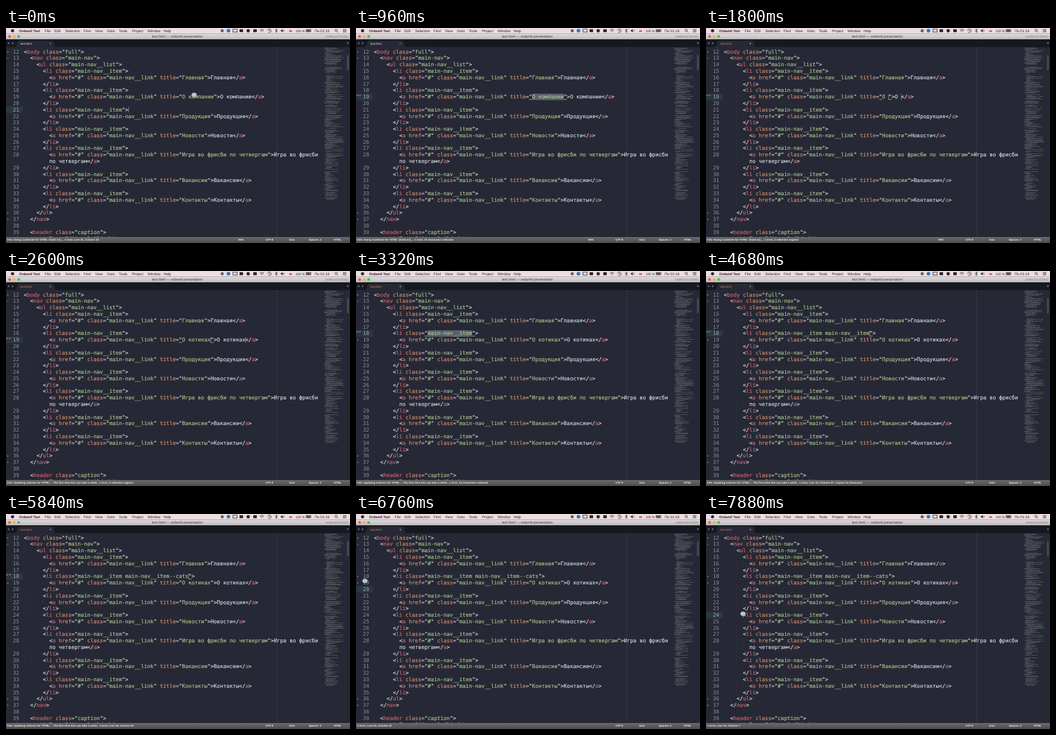
Recreate the animation shown at these times as an HTML page. Size 576 by 360 pixels, loop 8 s.

```html
<!DOCTYPE html>
<html lang="ru">
<head>
<meta charset="utf-8">
<title>Editor</title>
<style>
html, body { margin: 0; width: 100%; height: 100%; overflow: hidden; background: #262935; }
svg { display: block; width: 100vw; height: 100vh; }
text { white-space: pre; text-rendering: geometricPrecision; font-family: "Liberation Sans", Arial, sans-serif; }
.code text { font: 8.8px "DejaVu Sans Mono", monospace; stroke-width: .16px; }
.menu { font-size: 6.05px; fill: #2a2023; }
.status { font-size: 4.52px; font-weight: bold; fill: #eeeeef; }
</style>
</head>
<body>
<svg viewBox="0 0 576 360">
  <defs>
    <linearGradient id="title" x2="0" y2="1"><stop stop-color="#dedbde"/><stop offset="1" stop-color="#bfbcc0"/></linearGradient>
    <linearGradient id="bar" x2="0" y2="1"><stop stop-color="#6a6a6c"/><stop offset="1" stop-color="#4c4c4e"/></linearGradient>
  </defs>
  <g id="back"></g>
  <g id="editor" class="code"></g>
  <g id="chrome"></g>
  <g id="live"></g>
  <ellipse id="pointer" rx="4.2" ry="3.6" fill="#c3c5cc" stroke="#8f929c" stroke-width=".6"/>
</svg>
<script>
const LOOP = 8000, CHAR = 5.298, LEFT = 30, ROW = 10.79, FIRST = 12;
const COLOR = { bg: '#262935', text: '#d6d9df', tag: '#d4626e', attr: '#da9070', string: '#b0c68e' };
const $ = id => document.getElementById(id);
const esc = s => s.replace(/&/g, '&amp;').replace(/</g, '&lt;');
const rect = (x, y, w, h, fill, extra = '') =>
  `<rect x="${x}" y="${y}" width="${w}" height="${h}" fill="${fill}" ${extra}/>`;
const circle = (x, y, r, fill) => `<circle cx="${x}" cy="${y}" r="${r}" fill="${fill}"/>`;
const path = (d, stroke, width = .8, extra = '') =>
  `<path d="${d}" fill="none" stroke="${stroke}" stroke-width="${width}" ${extra}/>`;
const label = (x, y, s, extra = '') => `<text x="${x}" y="${y}" ${extra}>${esc(s)}</text>`;
const span = (s, color) => `<tspan fill="${color}" stroke="${color}">${esc(s)}</tspan>`;
const colX = col => LEFT + col * CHAR;
const rowY = line => 34.4 + (line - FIRST + (line > 28)) * ROW;

// ---- timeline of editor states ----
const INTEL = "Info: Doing CodeIntel for 'HTML' (hold on)..., ";
const INDEX = "Info: Updating indexes for 'HTML'... The first time this can take a while., ";
const TITLE_COL = 50, CLASS_COL = 17, ITEM = 'main-nav__item', MARKED = [12, 13, 36, 37];
const steps = [];
let state = {
  info: INTEL, pct: '95%', status: 'Line 21, Column 34', line: 21, carets: [33],
  sel: [], quotes: null, title: 'О компании', cls: ITEM, dirty: false, edited: []
};
function at(time, change) {
  state = { ...state, ...change, time };
  steps.push(state);
}
const titleEnds = n => [TITLE_COL + n, TITLE_COL + 2 * n + 2];
function setTitle(time, title) {
  const n = title.length;
  at(time, { title, carets: titleEnds(n), sel: [], quotes: [TITLE_COL - 1, TITLE_COL + n],
    pct: '80%', dirty: true, edited: [19] });
}
function setClass(time, cls, note = '') {
  const end = CLASS_COL + cls.length;
  at(time, { cls, carets: [end], sel: [], quotes: [CLASS_COL - 1, end], edited: cls === ITEM ? [19] : [18, 19],
    status: `Line 18, Column ${end + 1}${note}` });
}
at(0, {});
at(440, { line: 19, carets: [54], status: 'Line 19, Column 55', quotes: [49, 60] });
at(860, { carets: [], sel: [[50, 10]], status: '10 characters selected' });
at(1200, { sel: [[50, 10], [62, 10]], status: '2 selection regions' });
setTitle(1480, 'О');
setTitle(1640, 'О ');
[...'котиках'].forEach((c, i) => setTitle(1880 + i * 100, state.title + c));
at(2600, { info: INDEX, pct: '' });
at(2760, { carets: [59], status: 'Line 19, Column 60', quotes: [49, 59] });
at(2960, { line: 18, carets: [31], status: 'Line 18, Column 32', quotes: [16, 31] });
at(3160, { carets: [], sel: [[17, 14]], status: '14 characters selected' });
const copied = '; Copied 14 characters';
setClass(3640, ITEM, copied);
setClass(3960, ITEM + ' ', copied);
setClass(4320, ITEM + ' ' + ITEM, copied);
[...'--cats'].forEach((c, i) => setClass(5000 + i * 140, state.cls + c));
at(6200, { info: '', line: 20, carets: [11], quotes: null, status: 'Line 20, Column 12' });
at(7600, { line: 24, carets: [6], status: 'Line 24, Column 7' });

// ---- code ----
function paint(code) {
  return code.split(/(<\/?\w+|"[^"]*"|\b(?:class|href|title)(?==))/).map(part => {
    if (/^<\/?\w/.test(part)) {
      const [, open, tag] = part.match(/^(<\/?)(\w+)/);
      return span(open, COLOR.text) + span(tag, COLOR.tag);
    }
    if (part[0] === '"') return span('"', COLOR.text) + span(part.slice(1, -1), COLOR.string) + span('"', COLOR.text);
    return span(part, /^(class|href|title)$/.test(part) ? COLOR.attr : COLOR.text);
  }).join('');
}
function codeLines(s) {
  const lines = [[0, '<body class="full">'], [2, '<nav class="main-nav">'], [4, '<ul class="main-nav__list">']];
  const items = ['Главная', s.title, 'Продукция', 'Новости', 'Игра во фрисби по четвергам', 'Вакансии', 'Контакты'];
  items.forEach((name, i) => lines.push(
    [6, `<li class="${i === 1 ? s.cls : ITEM}">`],
    [8, `<a href="#" class="main-nav__link" title="${name}">${name}</a>`],
    [6, '</li>']));
  lines.push([4, '</ul>'], [2, '</nav>'], [0, ''], [2, '<header class="caption">'],
    [4, '<h1>Text Editor Build</h1>']);
  return lines;
}
function drawRow(indent, y, code) {
  let guides = '';
  for (let c = 0; c < indent; c += 2)
    guides += path(`M${colX(c) + .5} ${y}v${ROW}`, '#353945', .6, 'stroke-dasharray="1 1.2"');
  return guides + `<text x="${colX(indent)}" y="${y + 8.2}">${paint(code)}</text>`;
}
function drawEditor(s) {
  const y = rowY(s.line);
  let out = rect(0, y, 28, ROW, '#2b3841');
  for (const [col, n] of s.sel) out += rect(colX(col), y, n * CHAR, ROW, '#596170', 'rx="1"');
  codeLines(s).forEach(([indent, code], i) => {
    const line = FIRST + i, top = rowY(line), active = line === s.line;
    out += label(22, top + 8.2, String(line), `text-anchor="end" fill="${active ? '#a4a9b5' : '#8a8f9a'}"`);
    if (line === 28) {
      const cut = code.lastIndexOf('по четвергам');
      out += drawRow(indent, top, code.slice(0, cut).trimEnd()) + drawRow(indent, top + ROW, code.slice(cut));
    } else out += drawRow(indent, top, code);
  });
  for (const col of s.quotes || []) out += rect(colX(col), y + 9.4, CHAR, .8, '#b9bdc6');
  if (s.quotes) out += label(0, y + 7, '“”', 'style="font-size:7px" fill="#aeb2bb"');
  for (const line of [...MARKED, ...s.edited])
    if (!(s.quotes && line === s.line)) out += circle(3, rowY(line) + 5.5, .9, line === 13 ? '#c0606a' : '#9fa3ad');
  out += '<g id="carets">' + s.carets.map(c => rect(colX(c), y + .8, .6, ROW - 1.6, '#c2c5cb')).join('') + '</g>';
  return out;
}
function drawLive(s) {
  return label(24, 28, 'test.html', `font-size="5" fill="${s.dirty ? '#dc8058' : '#e6e7ea'}"`) +
    (s.dirty ? circle(74.2, 26, 1.2, '#8a8d96') : path('M73 24.8l2.4 2.4m0-2.4l-2.4 2.4', '#8a8d96', .7)) +
    `<g class="status">${label(2, 356.4, s.info + '1 error, ' + s.status)}${label(389, 356.4, s.pct)}</g>`;
}

// ---- fixed parts ----
function drawMinimap() {
  let seed = 11, out = '';
  const random = () => (seed = seed * 16807 % 2147483647) / 2147483647;
  const tones = ['#8b909c', '#8b7078', '#8b9c7c', '#8b909c'];
  for (let y = 33; y < 288; y += 1.45) {
    const dense = y > 184 && y < 192;
    let x = 533 + Math.floor(random() * 4) * 1.3;
    const end = y > 225 ? 541 + random() * 18 : dense ? 562 + random() * 5 : 541 + random() * 25;
    if (random() < .1) continue;
    while (x < end) {
      const w = Math.min(2 + random() * 6, end - x);
      out += rect(x.toFixed(1), y.toFixed(1), w.toFixed(1), .75, tones[Math.floor(random() * 4)]);
      x += w + .5;
    }
  }
  return `<g opacity=".6">${out}</g>`;
}
function drawMenu() {
  const items = [[65, 'File'], [81, 'Edit'], [99, 'Selection'], [130, 'Find'], [149, 'View'],
    [169, 'Goto'], [189, 'Tools'], [211, 'Project'], [237, 'Window'], [264, 'Help']];
  const ink = '#33292d';
  return rect(0, 0, 576, 9.5, '#ecdde0') + circle(11, 4.6, 2.7, ink) +
    `<g class="menu">${label(22, 6.8, 'Ordamil Text', 'font-weight="bold" font-size="5.8"')}` +
    items.map(([x, s]) => label(x, 6.8, s)).join('') +
    label(485, 6.8, '100 %', 'font-size="5.4"') + label(517, 6.8, 'Пн 01:16') + '</g>' +
    circle(362, 4.6, 2.6, '#656168') + circle(372.5, 4.6, 3, '#2b78c5') +
    rect(380, 2, 7, 4.8, 'none', `stroke="${ink}" stroke-width=".9"`) + rect(391, 2, 6, 5, ink, 'rx="1"') +
    circle(405.5, 4.6, 2.8, ink) + rect(414, 2, 6, 5, ink, 'rx="1"') +
    path('M425 3.6q3.5-3 7 0m-5.7 1.6q2.2-1.6 4.4 0m-2.2 1v1', ink) +
    path('M438 4.6a3 3 0 1 1 1 2.2M441 3v2h1.5', ink) +
    path('M450.5 3l4 3-2 1.6V1.4l2 1.6-4 3', ink, .7) +
    `<path d="M460 3.6h1.5l2-1.8v5.6l-2-1.8H460z" fill="${ink}"/>` + path('M465 3q1.4 1.6 0 3.2', ink) +
    rect(474, 2.4, 5, 4, '#d6584e') + rect(474, 2.4, 5, 1.4, '#f7f3f4') +
    rect(502.5, 2.5, 8, 4, 'none', `stroke="${ink}" stroke-width=".7"`) + rect(503.4, 3.4, 6, 2.2, ink) +
    `<circle cx="552.7" cy="4" r="2" fill="none" stroke="${ink}" stroke-width=".8"/>` + path('M554.2 5.5l2 2', ink) +
    path('M564 2.5h6m-6 2h6m-6 2h6', ink);
}
function drawChrome() {
  const status = [[434.5, 'UTF-8'], [474, 'Unix'], [507, 'Spaces: 2'], [549, 'HTML']];
  return drawMenu() + rect(0, 9.5, 576, 9.5, 'url(#title)') + rect(0, 18.6, 576, .5, '#8d8b91') +
    ['#f25d55', '#e9b93e', '#55bd46'].map((c, i) => circle(6 + i * 7.6, 14.2, 2.4, c)).join('') +
    label(287, 16.2, 'test.html — ordamil-presentation', 'text-anchor="middle" font-size="5.9" fill="#3b393d"') +
    label(573.5, 16, 'UNREGISTERED', 'text-anchor="end" font-size="4.9" fill="#77747a"') +
    rect(0, 19, 576, 13, '#171921') +
    '<path d="M14 32q3 0 4-4l1-4q1-3 3-3h55q2 0 3 3l1 4q1 4 4 4z" fill="#262935"/>' +
    '<path d="M5.5 23.5v4l-2.8-2zM10 23.5v4l2.8-2zM570.5 24.5h4l-2 2.8z" fill="#777b85"/>' +
    rect(0, 350, 576, 10, 'url(#bar)') +
    `<g class="status">${status.map(([x, s]) => label(x, 356.4, s)).join('')}</g>`;
}

// ---- playback ----
const mouse = [[6000, 180, 120], [6200, 110, 126], [6320, 110, 126], [6720, 15, 112],
  [6900, 15, 112], [7500, 62, 167], [8000, 62, 167]];
function pointerAt(t) {
  if (t < 860) return [315, 112];
  if (t < mouse[0][0]) return null;
  const i = mouse.findIndex(m => m[0] > t), [t0, x0, y0] = mouse[i - 1], [t1, x1, y1] = mouse[i];
  const k = (t - t0) / (t1 - t0), ease = k * k * (3 - 2 * k);
  return [x0 + (x1 - x0) * ease, y0 + (y1 - y0) * ease];
}
$('back').innerHTML = rect(0, 0, 576, 360, COLOR.bg);
$('chrome').innerHTML = path('M453.5 32V350', '#3a3e4a', .8) + drawMinimap() +
  rect(570.8, 45, 3.4, 26, '#444852', 'rx="1.7"') + drawChrome();
let shown;
function frame() {
  const t = performance.now() % LOOP;
  const current = steps.filter(s => s.time <= t).pop();
  if (current !== shown) {
    shown = current;
    $('editor').innerHTML = drawEditor(current);
    $('live').innerHTML = drawLive(current);
  }
  $('carets').style.opacity = (t - current.time) % 1000 < 500 ? 1 : 0;
  const p = pointerAt(t);
  $('pointer').style.opacity = p ? 1 : 0;
  if (p) $('pointer').setAttribute('transform', `translate(${p})`);
  requestAnimationFrame(frame);
}
frame();
</script>
</body>
</html>
```
